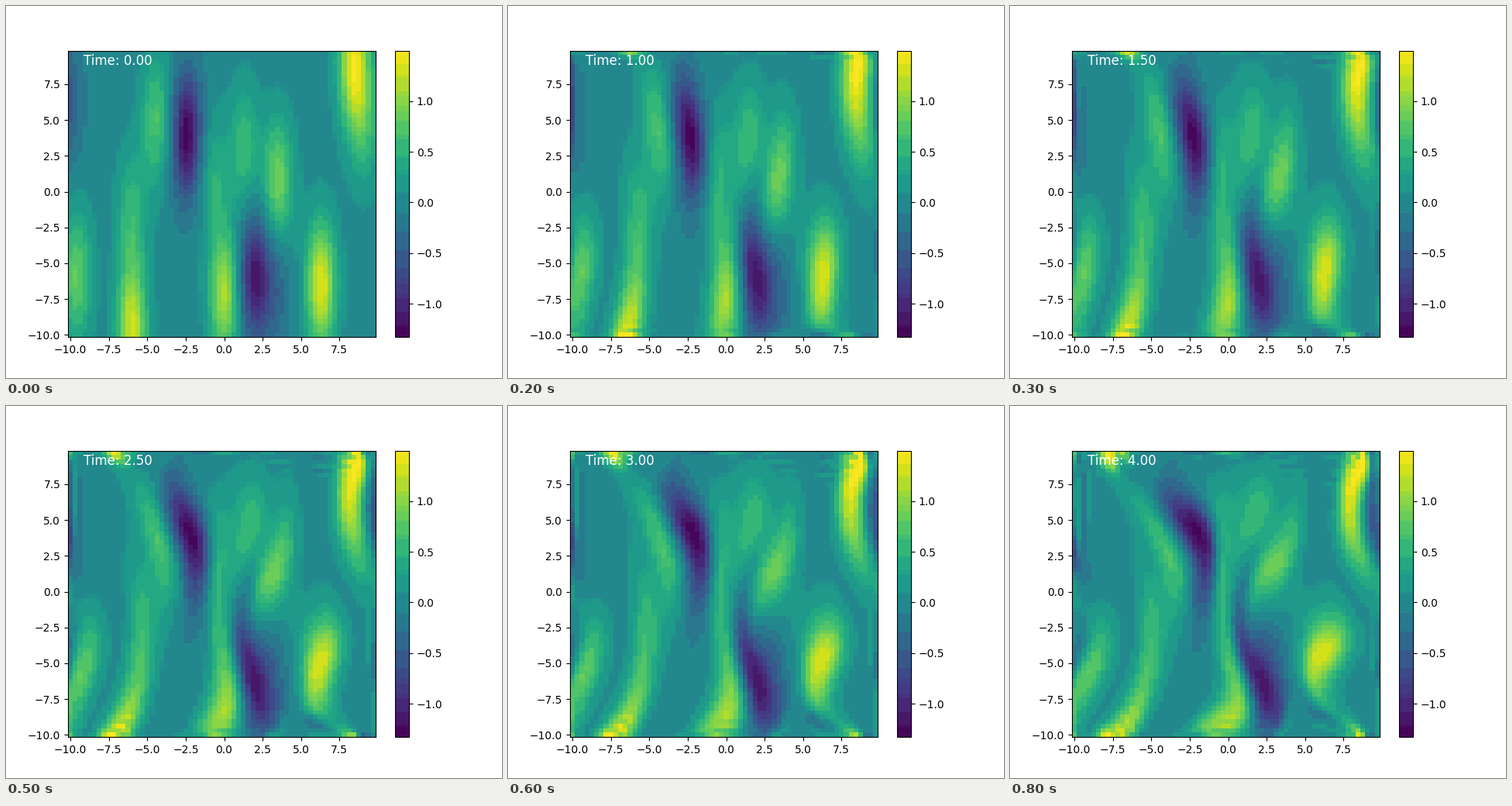
These frames come from a looping animation (640 px wide and 480 px high, 0.9 s). A matplotlib script:

```python
import numpy as np
import matplotlib.pyplot as plt
from matplotlib.animation import FuncAnimation
from matplotlib.colors import ListedColormap

# Vorticity-streamfunction flow on a periodic square
N, SIZE, NU = 64, 20.0, 0.001
FRAMES, STEP, SUBSTEPS = 9, 0.5, 10
H = SIZE / N

# Starting vortices as (x, y, strength); the solver does all the motion
VORTICES = [
    (-2.45, 3.9, -1.34), (-10.3, 6.4, -0.58), (-4.4, 5, 0.7),
    (-6, -1.8, 0.57), (-6, -9.6, 1.27), (-9.6, -5.9, 0.83),
    (0, -7.2, 1.13), (-0.7, 0.8, 0.46), (1.3, 3, 0.58),
    (3.5, 0.6, 0.94), (1.95, -5.9, -1.15), (3.3, -6.5, -0.42),
    (6.3, -6.5, 1.36), (8.4, 9.1, 1.35), (9.1, 5, 0.58),
]

axis = np.arange(N) * H - SIZE / 2
X, Y = np.meshgrid(axis, axis)
k = 2 * np.pi * np.fft.fftfreq(N, H)
K2 = k[None, :] ** 2 + k[:, None] ** 2
K2[0, 0] = 1.0


def vortex(x, y, strength):
    return strength * np.exp(-(X - x) ** 2 - (Y - y) ** 2 / 20)


def diff(f, ax):
    return (np.roll(f, -1, ax) - np.roll(f, 1, ax)) / (2 * H)


def laplacian(f):
    total = sum(np.roll(f, s, ax) for s in (-1, 1) for ax in (0, 1))
    return (total - 4 * f) / H**2


def rate(w):
    psi = np.real(np.fft.ifft2(-np.fft.fft2(w) / K2))
    bracket = diff(psi, 1) * diff(w, 0) - diff(psi, 0) * diff(w, 1)
    return bracket + NU * laplacian(w)


def advance(w):
    """One output step by fourth-order Runge-Kutta."""
    dt = STEP / SUBSTEPS
    for _ in range(SUBSTEPS):
        a = rate(w)
        b = rate(w + dt / 2 * a)
        c = rate(w + dt / 2 * b)
        d = rate(w + dt * c)
        w = w + dt / 6 * (a + 2 * b + 2 * c + d)
    return w


def banded_viridis():
    """Viridis flattened into bands of similar colour."""
    rgb = plt.get_cmap("viridis")(np.arange(256), bytes=True)[:, :3].astype(int)
    r, g, b = rgb.T
    key = (r >> 5) << 7 | (g >> 4) << 3 | b >> 5
    bands = np.array([rgb[key == v].mean(axis=0) for v in key])
    return ListedColormap(bands / 255)


fields = [sum(vortex(*v) for v in VORTICES)]
while len(fields) < FRAMES:
    fields.append(advance(fields[-1]))

fig, ax = plt.subplots(figsize=(6.4, 4.8), dpi=100)
mesh = ax.pcolormesh(X, Y, fields[0], cmap=banded_viridis(),
                     vmin=-1.33, vmax=1.498, shading="nearest")
fig.colorbar(mesh, ax=ax)
label = ax.text(0.05, 0.95, "", color="white", fontsize=12,
                transform=ax.transAxes)


def draw(i):
    mesh.set_array(fields[i])
    label.set_text(f"Time: {i * STEP:.2f}")
    return mesh, label


anim = FuncAnimation(fig, draw, frames=FRAMES, interval=100, repeat=True)
plt.show()
```
